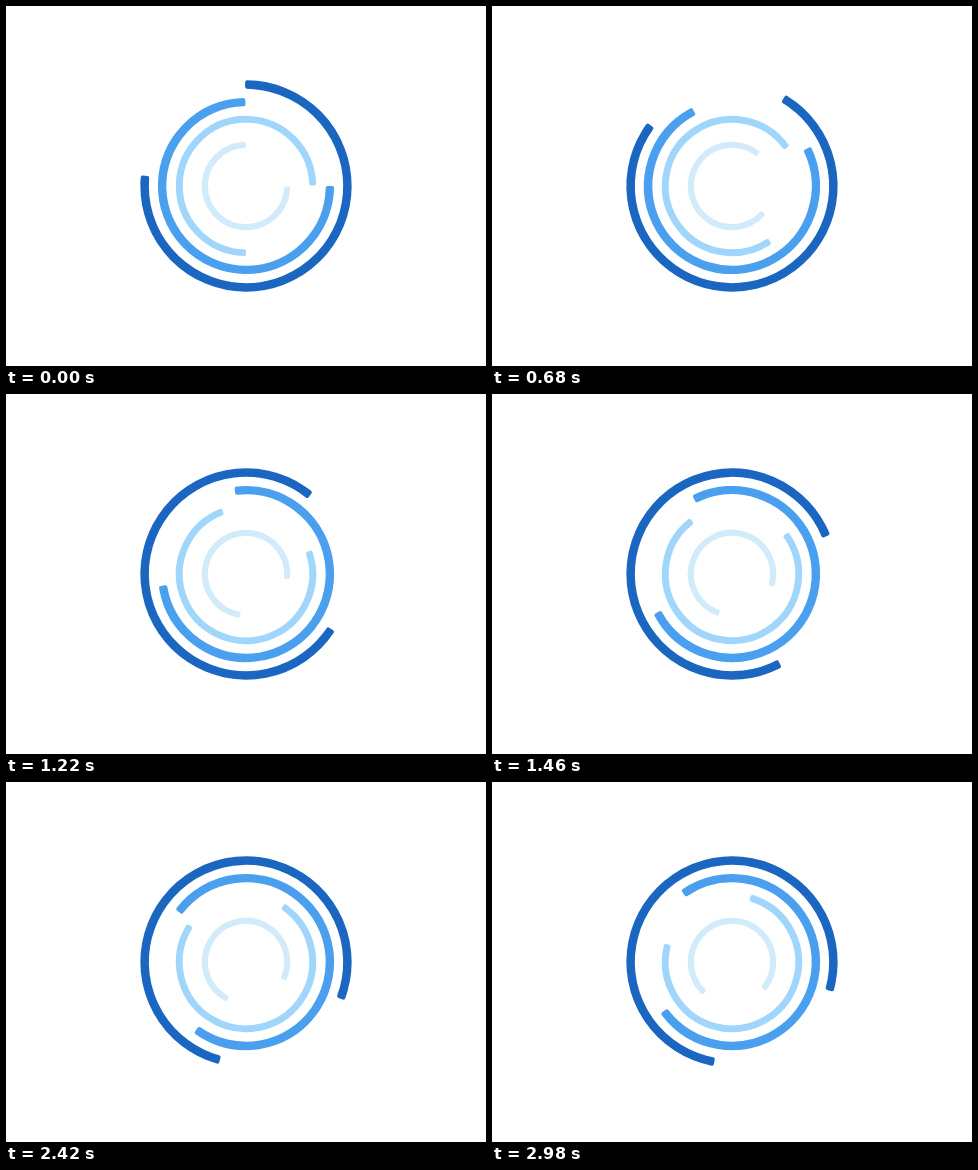
These frames come from a looping animation (480 by 360 pixels, 3 s). An HTML page with a canvas:

```html
<!DOCTYPE html>
<html lang="en">
<head>
<meta charset="utf-8">
<title>Ring loader</title>
<style>
html, body { margin: 0; width: 100%; height: 100%; overflow: hidden; background: #fff; }
canvas { display: block; width: 480px; height: 360px; }
</style>
</head>
<body>
<canvas id="stage"></canvas>
<script>
const LOOP = 3000;
const DRIFT_START = 2450;
const CORNER = 2;
const DEG = Math.PI / 180;

// Degrees run clockwise from the top. Each ring makes one eased swing
// lasting `time` ms, then starts to drift by `drift` degrees.
const rings = [
  { r: 101.4, w: 8.5, color: '#1a66c0', from: -0.5, span: 276.3, swing: 198, time: 2830, drift: -8 },
  { r: 83.9, w: 8.4, color: '#4a9fee', from: 90, span: 269.6, swing: -144, time: 2660, drift: 20 },
  { r: 66.7, w: 6.9, color: '#a0d6fb', from: 180, span: 269.6, swing: -146.5, time: 2430, drift: -19 },
  { r: 41.2, w: 6.2, color: '#d2ebfb', from: 91, span: 269, swing: 115, time: 2110, drift: 17 }
];

const canvas = document.getElementById('stage');
const ctx = canvas.getContext('2d');
const ratio = window.devicePixelRatio || 1;
canvas.width = 480 * ratio;
canvas.height = 360 * ratio;

// cubic-bezier(0.46, 0, 0.22, 1), solved by bisection.
function ease(x) {
  if (x >= 1) return 1;
  let lo = 0, hi = 1, s = 0.5;
  for (let i = 0; i < 24; i++) {
    s = (lo + hi) / 2;
    const q = 1 - s;
    const bx = 3 * q * q * s * 0.46 + 3 * q * s * s * 0.22 + s * s * s;
    if (bx < x) lo = s; else hi = s;
  }
  return s * s * (3 - 2 * s);
}

function turnAt(ring, t) {
  const late = Math.max(0, (t - DRIFT_START) / (LOOP - DRIFT_START));
  return ring.swing * ease(t / ring.time) + ring.drift * late * late;
}

// A ring sector with softly rounded corners.
function drawRing(ring, t) {
  const first = ring.from + turnAt(ring, t) - 90;
  const inset = CORNER / ring.r;
  const a = first * DEG + inset;
  const b = (first + ring.span) * DEG - inset;
  const half = ring.w / 2 - CORNER;
  ctx.beginPath();
  ctx.arc(240, 180, ring.r + half, a, b);
  ctx.arc(240, 180, ring.r - half, b, a, true);
  ctx.closePath();
  ctx.fillStyle = ctx.strokeStyle = ring.color;
  ctx.lineWidth = CORNER * 2;
  ctx.lineJoin = 'round';
  ctx.fill();
  ctx.stroke();
}

function draw(t) {
  ctx.setTransform(ratio, 0, 0, ratio, 0, 0);
  ctx.fillStyle = '#fff';
  ctx.fillRect(0, 0, 480, 360);
  for (const ring of rings) drawRing(ring, t);
}

const start = performance.now();
function tick() {
  draw((performance.now() - start) % LOOP);
  requestAnimationFrame(tick);
}
tick();
</script>
</body>
</html>
```
